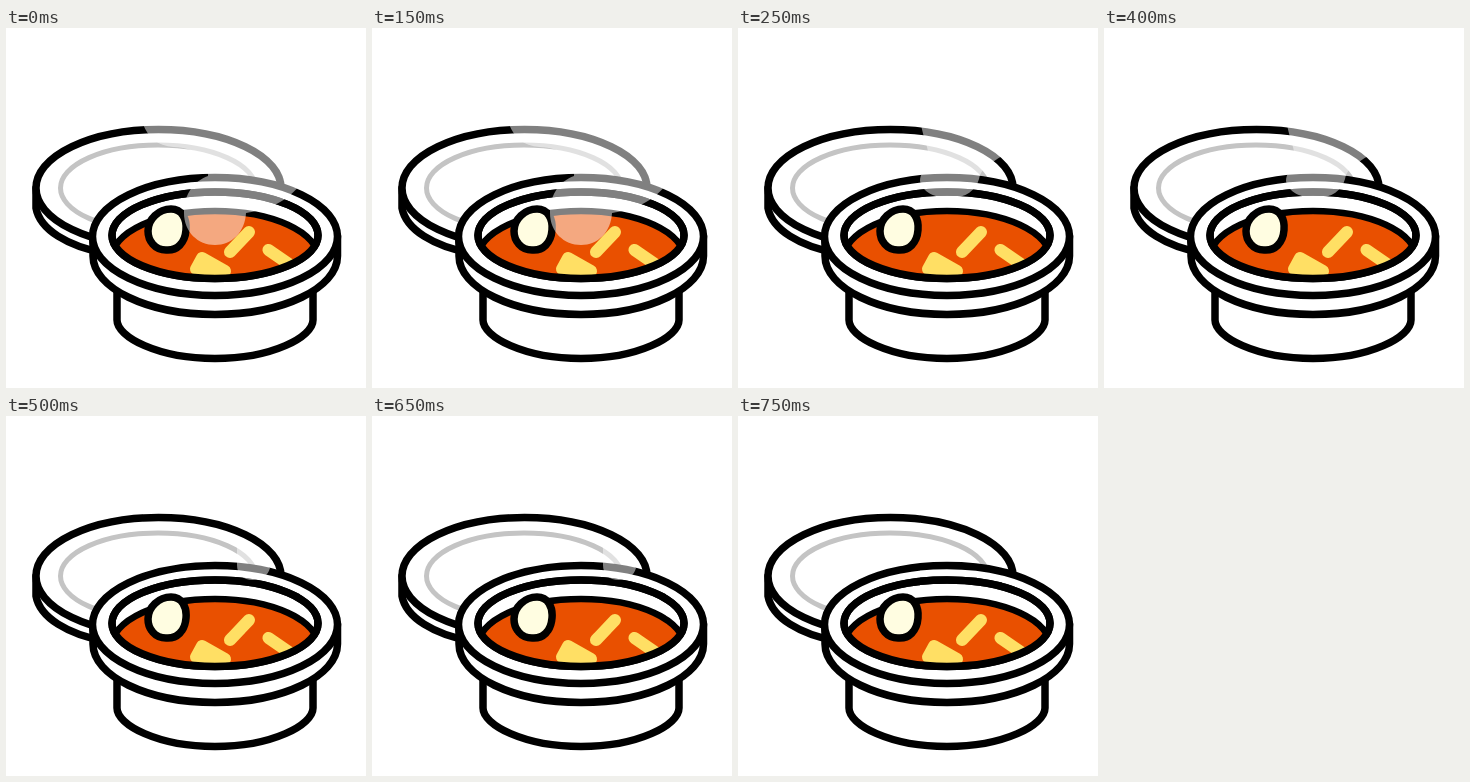
Write an HTML page that moves like this. It is 360 px wide and 360 px high and loops after 1 s.

```html
<!DOCTYPE html>
<html lang="en">
<head>
<meta charset="utf-8">
<title>Hot soup bowl</title>
<style>
  html, body { margin: 0; width: 100%; height: 100%; overflow: hidden; background: #fff; }
  svg { display: block; width: 100vw; height: 100vh; }
  .line { fill: #fff; stroke: #000; stroke-width: 7.5; stroke-linecap: round; stroke-linejoin: round; }
  .stick { fill: #ffdf64; stroke: #ffdf64; stroke-width: 12; stroke-linecap: round; stroke-linejoin: round; }
  .steam path { fill: #fff; opacity: .5; visibility: hidden; }
</style>
</head>
<body>
<svg viewBox="0 0 360 360">
  <defs>
    <clipPath id="opening"><ellipse cx="209" cy="207.200" rx="103" ry="43.300"/></clipPath>
  </defs>

  <g id="lid">
    <path class="line" d="M30 160V180C34 202 62 218 98 225L190 222L274 160Z"/>
    <ellipse class="line" cx="152.500" cy="160" rx="122.500" ry="58.500"/>
    <ellipse cx="152" cy="160" rx="97.500" ry="43" fill="none" stroke="#c4c4c4" stroke-width="5"/>
  </g>

  <g id="bowl">
    <path class="line" d="M111 262V292C111 309 152 330.500 209 330.500S307 309 307 292V262Z"/>
    <path class="line" d="M87 208V228C87 260 141 286.500 209 286.500S331.500 260 331.500 228V208Z"/>
    <ellipse class="line" cx="209" cy="208.500" rx="122.500" ry="59"/>
    <ellipse class="line" cx="209" cy="207.200" rx="103" ry="43.300"/>
    <g clip-path="url(#opening)">
      <ellipse cx="209" cy="230" rx="103" ry="47" fill="#e95000" stroke="#000" stroke-width="6.500"/>
      <path class="stick" d="M224 224L243 204M262.500 222L293 243"/>
      <path class="stick" d="M196 230L219 243L190 241Z"/>
    </g>
    <ellipse class="line" cx="209" cy="207.200" rx="103" ry="43.300" style="fill:none"/>
    <path d="M165 181C176 181 181 191 180 202C179 215 171 223 160 222C149 222 142 213 142 203C142 191 153 181 165 181Z"
      fill="#fffde1" stroke="#000" stroke-width="7.500"/>
  </g>

  <g class="steam">
    <path d="M137 96C142 109 151 118 168 119C190 120 204 130 202 148
      C188 153 178 166 178 185C178 204 192 217 209 217C226 217 239 204 240 185
      C262 182 284 172 294 156L278 152C276 124 230 96 180 94Z"/>
    <path d="M183 96C185 111 192 120 190 133C187 141 182 146 182 153
      C184 164 197 170 212 170C228 170 238 162 241 151C242 141 253 135 264 128
      C250 112 223 101 198 96Z"/>
    <path d="M231 132L247 134C253 139 258 145 260 149L264 152C262 160 255 164 247 164C237 164 231 158 231 149Z"/>
  </g>
</svg>
<script>
  const LOOP = 1000, STEP = 250;
  const puffs = [...document.querySelectorAll('.steam path')];

  function draw(now) {
    const step = Math.floor((now % LOOP) / STEP);
    puffs.forEach((puff, i) => {
      puff.style.visibility = i === step ? 'visible' : 'hidden';
    });
  }

  const start = performance.now();
  function tick() {
    draw(performance.now() - start);
    requestAnimationFrame(tick);
  }
  tick();
</script>
</body>
</html>
```
